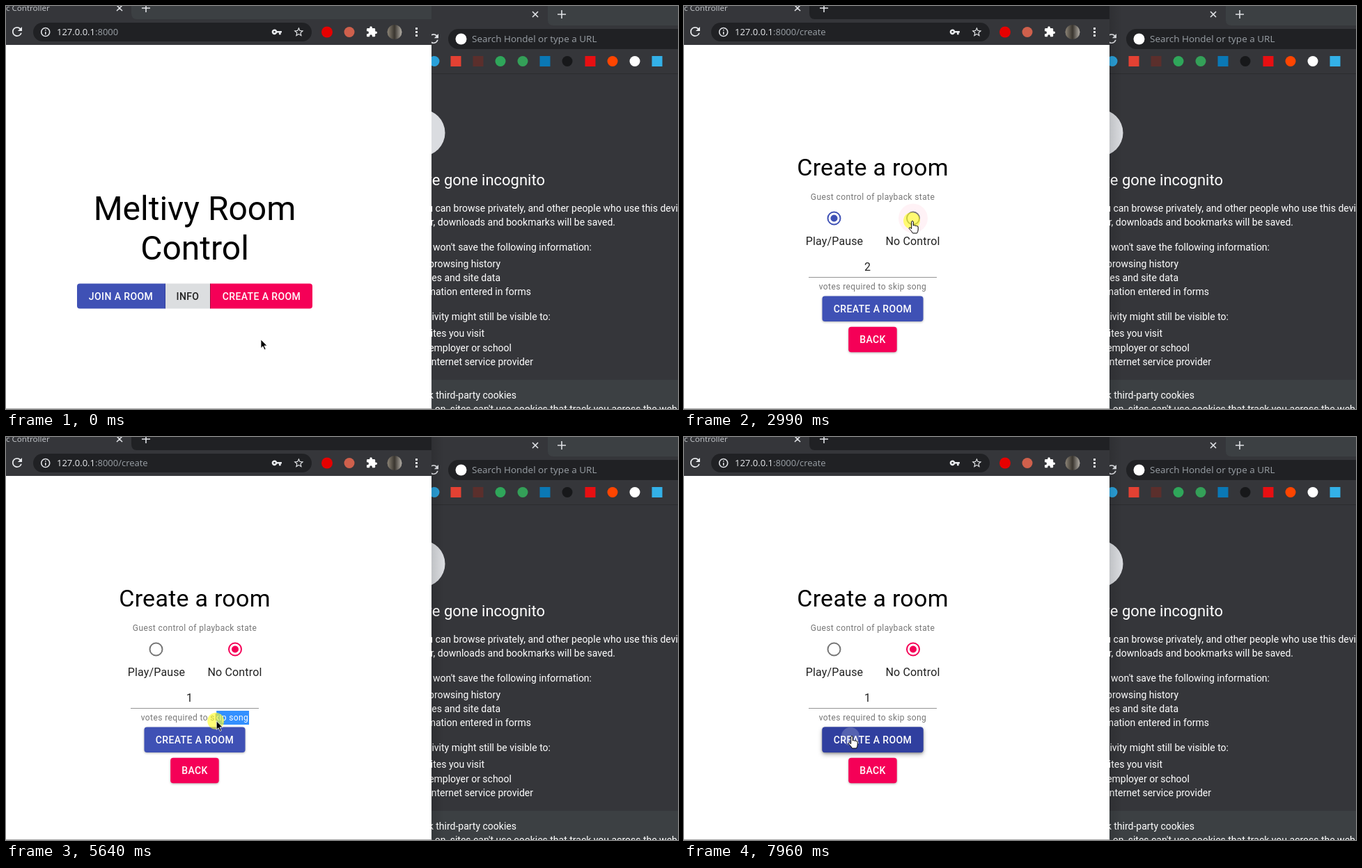
Write an HTML page that moves like this. It is 965 px wide and 580 px high and loops after 8 s.

```html
<!DOCTYPE html>
<html lang="en">
<head>
<meta charset="utf-8">
<title>Room control</title>
<style>
html, body { margin: 0; width: 100%; height: 100%; overflow: hidden; background: #35363a; }
svg { display: block; font: 14px Roboto, sans-serif; }
.ui { font-family: "Open Sans", sans-serif; }
.mid { text-anchor: middle; }
.end { text-anchor: end; }
.btn { font-weight: 500; letter-spacing: .4px; text-anchor: middle; fill: #fff; }
.small { font-size: 12px; letter-spacing: .4px; text-anchor: middle; fill: #000; fill-opacity: .54; }
.label { font-size: 16px; letter-spacing: .15px; text-anchor: middle; fill: #000; fill-opacity: .87; }
.raised { filter: drop-shadow(0 1.5px 1.5px rgba(0,0,0,.3)); }
.lifted { filter: drop-shadow(0 3px 3px rgba(0,0,0,.3)); }
.line { fill: none; stroke: #dfe1e5; stroke-width: 1.6; }
</style>
</head>
<body>
<svg width="965" height="580" viewBox="0 0 965 580">
  <defs>
    <linearGradient id="photo"><stop offset="0" stop-color="#8d8577"/><stop offset=".5" stop-color="#39352f"/><stop offset="1" stop-color="#b5b0a8"/></linearGradient>
    <linearGradient id="shade"><stop offset="0" stop-opacity=".12"/><stop offset="1" stop-opacity="0"/></linearGradient>
    <clipPath id="rightClip"><path d="M611 0h354v580H611z"/></clipPath>
    <clipPath id="homeClip"><path d="M294 399.500h142a4 4 0 0 1 4 4v28a4 4 0 0 1-4 4H294z"/></clipPath>
    <clipPath id="makeClip"><rect x="198.500" y="417.500" width="145" height="36.500" rx="4"/></clipPath>
    <clipPath id="selClip"><rect id="selBox" y="394" height="20"/></clipPath>
    <path id="reload" d="M17.65 6.35A8 8 0 0 0 12 4a8 8 0 1 0 7.73 10h-2.08A6 6 0 1 1 12 6c1.66 0 3.14.69 4.22 1.78L13 11h7V4z"/>
  </defs>

  <!-- right window -->
  <g clip-path="url(#rightClip)">
    <path fill="#35363a" d="M611 0h354v580H611z"/>
    <path fill="#3c4043" d="M778 0h187v28H786q-8 0-8-8z"/>
    <path class="line" d="M756 8l8 8m0-8l-8 8M792 12h12m-6-6v12"/>
    <rect x="635" y="33" width="360" height="29" rx="14.5" fill="#202124"/>
    <circle cx="653.5" cy="47.5" r="8" fill="#fff"/>
    <text class="ui" x="669" y="52" style="font-size:13.5px" fill="#9aa0a6">Search Hondel or type a URL</text>
    <use href="#reload" transform="translate(603.4 36.5) scale(.88)" fill="#dfe1e5"/>
    <g id="marks"></g>
    <path fill="#2b2c2f" d="M611 97h354v1H611z"/>
    <circle cx="597" cy="182.500" r="33.500" fill="#dadce0"/>
    <path fill="#3c4043" d="M611 538h354v42H611z"/>
    <g id="notes" fill="#fff">
      <text class="end" x="774" y="257.500" style="font-size:22px">You've gone incognito</text>
      <text x="590.700" y="296">you can browse privately, and other people who use this device</text>
      <text x="577" y="585">When on, sites can't use cookies that track you across the web</text>
    </g>
    <path id="edge" fill="url(#shade)" d="M611 0h18v580h-18z"/>
  </g>

  <!-- left window -->
  <path id="strip" d="M0 0h611v24H0z"/>
  <path fill="#35363a" d="M0 0h180v10q0 9 8 9h423v37H0z"/>
  <text class="ui" x="0" y="6.500" style="font-size:11.6px" fill="#c4c7cb">c Controller</text>
  <path class="line" d="M159-1l8 8m0-8l-8 8M195 3h12m-6-6v12"/>
  <rect x="39" y="24" width="400" height="27" rx="13.5" fill="#202124"/>
  <g fill="#e8eaed">
    <use href="#reload" transform="translate(5.4 26.4) scale(.88)"/>
    <path transform="translate(381 29.500) scale(.65)" d="M12.65 10A6 6 0 1 0 12.65 14H17v4h4v-4h2v-4zM7 14a2 2 0 1 1 0-4 2 2 0 0 1 0 4z"/>
    <path transform="translate(412 29) scale(.7)" d="M22 9.24l-7.19-.62L12 2 9.19 8.63 2 9.24l5.46 4.73L5.82 21 12 17.27 18.18 21l-1.63-7.03zM12 15.4l-3.76 2.27 1-4.28-3.32-2.88 4.38-.38L12 6.1l1.71 4.04 4.38.38-3.32 2.88 1 4.28z"/>
    <path transform="translate(516.500 28.500) scale(.72)" fill="#fff" d="M20.500 11H19V7c0-1.100-.9-2-2-2h-4V3.500a2.500 2.500 0 0 0-5 0V5H4c-1.100 0-2 .9-2 2v3.800h1.500a2.700 2.700 0 0 1 0 5.400H2V20c0 1.100.9 2 2 2h3.800v-1.500a2.700 2.700 0 0 1 5.400 0V22H17c1.100 0 2-.9 2-2v-4h1.500a2.500 2.500 0 0 0 0-5z"/>
    <path d="M588 31h3v3h-3zM588 36h3v3h-3zM588 41h3v3h-3zM56 37h1.500v4H56zM56 34h1.500v1.600H56z"/>
    <text class="ui" x="73" y="42" style="font-size:13px">127.0.0.1<tspan id="url" fill="#9aa0a6"></tspan></text>
  </g>
  <circle class="line" cx="56.700" cy="37.500" r="6"/>
  <circle cx="461" cy="37.500" r="8" fill="#e60000"/>
  <circle cx="493" cy="37.500" r="7.500" fill="#cf604c"/>
  <circle cx="558" cy="37.500" r="10.500" fill="url(#photo)"/>
  <path fill="#fff" d="M0 56h611v523H0z"/>
  <path fill="#a8a8a8" d="M0 579h611v1H0z"/>

  <g id="home">
    <g class="mid" style="font-size:48px"><text x="271" y="308">Meltivy Room</text><text x="271" y="365">Control</text></g>
    <path fill="#3f51b5" d="M228 399.500H106a4 4 0 0 0-4 4v28a4 4 0 0 0 4 4h122z"/>
    <path fill="#dcdee0" d="M228 399.500h66v36h-66z"/>
    <g clip-path="url(#homeClip)">
      <path fill="#f50057" d="M294 399h146v37H294z"/>
      <path id="homeHover" fill="#c51162" d="M294 399h146v37H294z"/>
      <circle id="homeRipple" cx="355" cy="412" fill="#fff" opacity=".3"/>
    </g>
    <path fill="#303f9f" d="M228 399.500h1v36h-1z"/><path fill="#ab003c" d="M293 399.500h1v36h-1z"/>
    <text class="btn" x="165" y="423">JOIN A ROOM</text>
    <text class="btn" x="261" y="423" style="fill:#212121">INFO</text>
    <text class="btn" x="367" y="423">CREATE A ROOM</text>
  </g>

  <g id="form">
    <text class="mid" x="271" y="244" style="font-size:34px;letter-spacing:.25px">Create a room</text>
    <text class="small" x="271" y="279">Guest control of playback state</text>
    <circle id="halo" cx="329" cy="305.500" r="21" fill="#f50057"/>
    <circle id="ringA" cx="215.500" cy="305.500" r="9" fill="none" stroke-width="2"/>
    <circle id="dotA" cx="215.500" cy="305.500" fill="#3f51b5"/>
    <circle id="ringB" cx="329" cy="305.500" r="9" fill="none" stroke-width="2"/>
    <circle id="dotB" cx="329" cy="305.500" fill="#f50057"/>
    <text class="label" x="216" y="344">Play/Pause</text>
    <text class="label" x="328.500" y="344">No Control</text>
    <text id="votes" class="label" x="263.500" y="380.500"></text>
    <path id="caret" d="M266 366h1v18h-1z"/>
    <path fill="#949494" d="M179 390h184v1H179z"/>
    <path id="hoverLine" fill="#212121" d="M179 389h184v2H179z"/>
    <rect id="focusLine" y="389" height="2" fill="#3f51b5"/>
    <g id="spin"><path fill="#efefef" d="M348 366h14v19h-14z"/><path fill="#505050" d="M351 373.500l4-4.500 4 4.500zM351 377.500l4 4.500 4-4.500z"/></g>
    <text class="small" x="271" y="408">votes required to skip song</text>
    <g clip-path="url(#selClip)">
      <path fill="#3390ff" d="M193 394h156v20H193z"/>
      <text class="small" x="271" y="408" style="fill:#fff;fill-opacity:1">votes required to skip song</text>
    </g>
    <rect class="raised" x="198.500" y="417.500" width="145" height="36.500" rx="4" fill="#3f51b5"/>
    <rect id="makeHover" class="lifted" x="198.500" y="417.500" width="145" height="36.500" rx="4" fill="#303f9f"/>
    <circle id="makeRipple" cx="239" cy="431" fill="#fff" opacity=".18" clip-path="url(#makeClip)"/>
    <text class="btn" x="271" y="441">CREATE A ROOM</text>
    <rect class="raised" x="236.200" y="461.700" width="69.500" height="36.500" rx="4" fill="#f50057"/>
    <text class="btn" x="271" y="485">BACK</text>
  </g>

  <circle id="press" r="12" fill="#ffff20" opacity=".62"/>
  <g id="cursor">
    <path id="arrow" d="M0 0v12.500l2.900-2.700 2.200 4.900 2-.9-2.200-4.800H9z" stroke="#fff" stroke-width=".8"/>
    <path id="hand" d="M-1.300 1.300Q0-.8 1.300 1.300V7q1.500-1 2.500.3 1.500-.8 2.500.5 1.700-.5 1.900 1.200v4Q8 16 6.500 18h-6Q-1 15-4.700 11.500q-.3-2 1.400-1.700l2 1.700z" fill="#fff" stroke="#000"/>
    <path id="beam" d="M-3-6.500h2.300l.7.600.7-.6H3M0-6V6M-3 6.500h2.300l.7-.6.7.6H3" fill="none" stroke="#222"/>
  </g>
</svg>
<script>
const LOOP = 8000, PAGE = 1530, PICK = 3060, FOCUS = 4440, BLUR = 5200;
const el = {};
document.querySelectorAll("[id]").forEach(e => el[e.id] = e);
const set = (id, attrs) => { for (const k in attrs) el[id].setAttribute(k, attrs[k]); };
const show = (id, on) => { el[id].style.display = on ? "" : "none"; };
const ramp = (t, a, b) => { const u = Math.min(1, Math.max(0, (t - a) / (b - a))); return u * u * (3 - 2 * u); };
const within = (v, a, b) => v >= a && v < b;

// plain bookmark shapes: x, colour, round
el.marks.innerHTML = [
  [615, "#2aa1da", 1], [646, "#e34133", 0], [678, "#5b2f2c", 0], [710, "#2fa65a", 1], [742, "#34a058", 1],
  [774, "#0a78b5", 0], [806, "#17181a", 1], [839, "#e80f12", 0], [871, "#ff4500", 1], [903, "#fff", 1], [935, "#33b1e8", 0]
].map(([x, c, round]) => `<rect x="${x - 7.5}" y="72" width="15" height="15" rx="${round * 7.5}" fill="${c}"/>`).join("");

// right edge, baseline, text
el.notes.innerHTML += [
  [875, 316, "your device won't see your activity. However, downloads and bookmarks will be saved."],
  [841, 352, "This window won't save the following information:"],
  [710, 376, "Your browsing history"],
  [710, 396, "Cookies and site data"],
  [754, 416, "Information entered in forms"],
  [782, 452, "Your activity might still be visible to:"],
  [687, 476, "Websites you visit"],
  [726, 497, "Your employer or school"],
  [757, 517, "Your internet service provider"],
  [733, 565, "Block third-party cookies"]
].map(([x, y, s]) => `<text class="end" x="${x}" y="${y}">${s}</text>`).join("");

// pointer path: time, x, y
const path = [
  [0, 366, 480], [70, 366, 480], [790, 354, 410.5], [880, 355, 412.5], [1700, 355, 412.5], [1840, 354, 418],
  [2150, 345, 395], [2300, 336, 372], [2520, 330, 343], [2680, 327, 299], [2760, 328, 309], [3200, 328, 309],
  [3680, 330, 366], [3760, 330, 366], [4050, 352, 377], [4200, 355, 379], [4560, 355, 379], [4950, 352, 410],
  [5180, 351, 404], [5410, 350, 404], [5700, 290, 410], [5930, 215, 419], [6090, 192, 404], [6250, 190, 398],
  [6400, 186, 380], [6530, 186, 380], [6800, 152, 425], [6950, 152, 445], [7080, 152, 445], [7300, 200, 427],
  [7560, 241, 430], [8000, 241, 430]
];
const presses = [[1360, 1530], [2910, 3080], [FOCUS, 4600], [BLUR, 6540], [6800, 6900]];

function pointer(t) {
  const i = path.findIndex(k => k[0] > t), [a, x, y] = path[i - 1], [b, x2, y2] = path[i];
  const u = (t - a) / (b - a);
  return [x + (x2 - x) * u, y + (y2 - y) * u];
}

function draw(t) {
  const [x, y] = pointer(t);
  const home = t < PAGE, picked = t >= PICK, focused = within(t, FOCUS, BLUR);
  const overInput = within(t, PAGE, BLUR) && within(y, 359, 391) && within(x, 179, 363);

  show("home", home);
  show("form", !home);
  el.url.textContent = home ? ":8000" : ":8000/create";
  set("strip", { fill: t < 1360 ? "#3c4043" : "#202124" });
  show("edge", t >= 1360);
  set("homeHover", { opacity: ramp(t, 520, 770) });
  set("homeRipple", { r: Math.max(0, t - 1360) * .2 });

  set("halo", { opacity: .05 * (ramp(t, 2860, 2960) - ramp(t, 3380, 3500)) + .1 * (ramp(t, 2990, 3120) - ramp(t, 3150, 3500)) });
  set("ringA", { stroke: picked ? "#757575" : "#3f51b5" });
  set("ringB", { stroke: picked ? "#f50057" : "#757575" });
  set("dotA", { r: 5 * (1 - ramp(t, PICK, PICK + 150)) });
  set("dotB", { r: 5 * ramp(t, PICK, PICK + 150) });

  el.votes.textContent = t < FOCUS ? "2" : "1";
  show("caret", focused && (t - FOCUS) % 1060 < 530);
  show("hoverLine", overInput && !focused);
  show("spin", overInput || focused);
  const w = 184 * (ramp(t, FOCUS, FOCUS + 180) - ramp(t, BLUR, BLUR + 180));
  set("focusLine", { x: 271 - w / 2, width: w });

  const left = t < 6090 ? Math.max(193, x) : 193;
  set("selBox", { x: left, width: within(t, 5380, 6830) ? Math.max(0, 349 - left) : 0 });
  set("makeHover", { opacity: .5 * (ramp(t, 5850, 6000) - ramp(t, 6010, 6260)) + ramp(t, 7300, 7550) });
  set("makeRipple", { r: Math.max(0, Math.min(14, (t - 7860) * .13)) });

  show("press", presses.some(([a, b]) => within(t, a, b)));
  set("press", { cx: x - 1, cy: y });
  const hand = home ? y < 435 : within(t, PAGE, 4000) ? y < 357 : t > 7295;
  const beam = overInput && x < 347;
  show("hand", hand);
  show("beam", beam && !hand);
  show("arrow", !hand && !beam);
  set("cursor", { transform: `translate(${x} ${y})` });
}

function tick(now) {
  draw(now % LOOP);
  requestAnimationFrame(tick);
}
tick(0);
</script>
</body>
</html>
```
